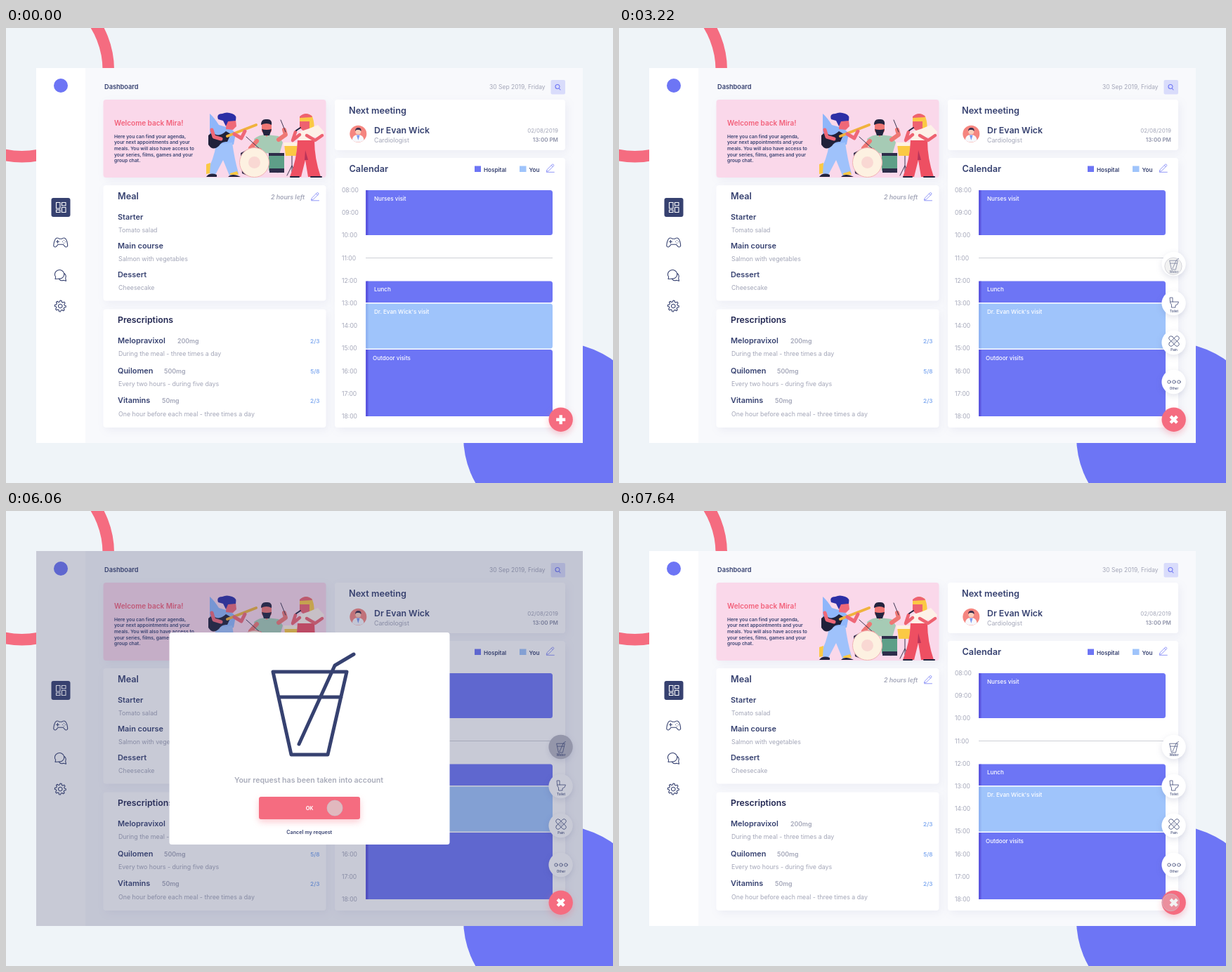
Recreate the animation shown at these times as an HTML page. Size 864 by 648 pixels, loop 8000 ms.

```html
<!DOCTYPE html>
<html lang="en">
<head>
<meta charset="utf-8">
<title>Dashboard</title>
<style>
  html, body { margin: 0; height: 100%; overflow: hidden; background: #eff4f8; }
  svg { display: block; width: 100vw; height: 100vh; font-family: Inter, sans-serif; }
  text { fill: #364170; white-space: pre; }
  .title { font-size: 12.7px; font-weight: 600; }
  .sub { font-size: 10.9px; font-weight: 600; }
  .note { font-size: 8.8px; fill: #a3a6b8; }
  .bold { font-weight: 600; }
  .hour { font-size: 8.5px; fill: #a3a6b8; }
  .event { font-size: 8.1px; font-weight: 500; fill: #fff; }
  .count { font-size: 8.2px; font-weight: 600; fill: #82abf0; text-anchor: end; }
  .copy { font-size: 6.75px; font-weight: 600; }
  .tag { font-size: 4.6px; font-weight: 500; text-anchor: middle; }
  .mid { text-anchor: middle; }
  .card { fill: #fff; filter: drop-shadow(3px 4px 6px rgba(80, 90, 160, .07)); }
  .line { fill: none; stroke: #364170; stroke-width: 1.1; stroke-linecap: round; stroke-linejoin: round; }
  .thin { stroke-width: .75; }
  .blue { stroke: #6d75f5; }
  .bubble { fill: #fff; filter: drop-shadow(0 3px 4px rgba(60, 65, 120, .14)); }
  .glow { fill: #f56c80; filter: drop-shadow(0 4px 5px rgba(245, 108, 128, .35)); }
</style>
</head>
<body>
<svg viewBox="0 0 864 648">
  <defs>
    <path id="glass" d="M380 229H485L458 347H406ZM388 265H477M417 332L468 220L495 204"/>
    <path id="pencil" class="line blue thin" d="M-4.500 2.500L2.500-4.500Q3.500-5.500 4.500-4.500Q5.500-3.500 4.500-2.500L-2.500 4.500L-5.300 5.300ZM1.500-3.500L3.500-1.500M-5.300 6.300H5.500"/>
  </defs>

  <circle cx="22.600" cy="60" r="123.200" fill="none" stroke="#f56c80" stroke-width="16.500"/>
  <circle cx="785.300" cy="582" r="134.300" fill="#6d75f5"/>
  <path fill="#f8f9fc" d="M43 57H821V591H43Z"/>
  <path fill="#fff" d="M43 57H113V591H43Z"/>

  <!-- sidebar -->
  <circle cx="78" cy="82" r="10" fill="#6d75f5"/>
  <rect x="64.500" y="242" width="27" height="27" rx="3" fill="#364170"/>
  <path class="line" style="stroke:#fff" d="M71.500 248.500H77V257H71.500ZM79.500 248.500H85V253H79.500ZM71.500 259H77V262.500H71.500ZM79.500 255.500H85V262.500H79.500Z"/>
  <path class="line" d="M73 299Q75 299 76 300.300H79.500Q80.500 299 82.500 299Q86 299 87.500 307.500Q88.300 312 85.500 312Q84 312 81.500 308.300H74Q71.500 312 70 312Q67.200 312 68 307.500Q69.500 299 73 299ZM71.500 304.300H75.500M73.500 302.300V306.300M80.500 304.300h.1M84.500 304.300h.1M82.500 302.300h.1M82.500 306.300h.1"/>
  <path class="line" d="M70 357.500L70.700 354.500A6.700 6.300 0 1 1 75 357ZM82.500 349.300Q86.500 352 84.700 356.300L85.500 360.300L81.700 359.300Q77.700 361 75 357"/>
  <g class="line" id="gear" transform="translate(77.300 396)"><circle r="2.800"/></g>

  <!-- header -->
  <text x="140" y="87" class="bold" font-size="9.200">Dashboard</text>
  <text x="688" y="87" class="hour">30 Sep 2019, Friday</text>
  <rect x="775.500" y="74" width="20.500" height="20.500" rx="2" fill="#d9dcfb"/>
  <path class="line blue" d="M788 83.500a3 3 0 1 0-6 0a3 3 0 1 0 6 0M787.200 86L789 88"/>

  <!-- banner -->
  <rect class="card" x="138.500" y="102" width="317" height="111" rx="4" style="fill:#fad8ea"/>
  <text x="154" y="138.500" class="bold" font-size="10" style="fill:#f2607a">Welcome back Mira!</text>
  <g id="copy"></g>
  <g stroke-linecap="round" stroke-linejoin="round">
    <!-- guitarist -->
    <path fill="#8fb6fa" d="M290 122Q296 127 303 138L320 143L327 150L324 166L301 169L290 153Z"/>
    <path fill="#ef6878" d="M314 129L327 131L328 140L323 145L313 144Z"/>
    <path fill="#2c2fa6" d="M302 130Q299 122 308 122Q314 119 322 122Q329 124 327 132L316 133L313 140L309 132Z"/>
    <path fill="#9fc2fb" d="M299 166L322 163Q325 186 331 207L318 210L309 188L298 209L285 206Q296 187 299 166Z"/>
    <path fill="#fbc944" d="M285 194L291 192L290 207L285 208ZM319 207L329 204L331 209H319Z"/>
    <path fill="#23243f" d="M285 212Q290 205 300 209V212ZM316 212Q322 206 334 212Z"/>
    <path fill="#20213a" d="M288 153Q293 147 299 152Q306 154 313 147L320 151L315 162Q307 161 303 168Q294 176 288 166Z"/>
    <path fill="none" stroke="#f0b23c" stroke-width="4" d="M315 154L356 138"/>
    <path fill="none" stroke="#ef6878" stroke-width="5" d="M293 145L296 155L306 158M325 151L335 157L340 147"/>
    <!-- drummer -->
    <path fill="#a6cbb5" d="M353 158Q361 151 372 152L388 154L394 163L389 180L357 177Z"/>
    <path fill="#ef7774" d="M364 133H378V147L371 155L364 147Z"/>
    <path fill="#23243f" d="M363 138Q363 129 371 130Q379 129 378 138Q371 134 363 138ZM364 144Q371 146 378 144L375 153H367Z"/>
    <path fill="none" stroke="#ef7774" stroke-width="6" d="M357 161L348 171L361 174M388 159L398 152L396 145"/>
    <path fill="none" stroke="#3a3550" d="M398 148L391 131M362 173L342 155M407 169V205M400 210L407 196L414 210"/>
    <path fill="#5e9f88" d="M374 180H396V204Q386 209 374 203Z"/>
    <path fill="#2e2d4a" d="M374 178H396V182H374ZM375 200H396V206H375ZM334 178L346 172V211L336 207Z"/>
    <circle cx="353.500" cy="191.500" r="21" fill="#fdf1e1" stroke="#f2b3b4"/>
    <circle cx="353.500" cy="191.500" r="8.500" fill="#f9d8d3"/>
    <path fill="#fbc944" d="M396 165H415L413 182H398Z"/>
    <path fill="#fdf1e1" d="M395 163H416V168H395Z"/>
    <!-- singer -->
    <path fill="#fbc944" d="M418 127Q427 118 436 126Q440 137 438 149L430 151L418 139Z"/>
    <path fill="#ee6270" d="M418 126Q427 118 436 126L432 130V143L425 148L418 142Z"/>
    <path fill="#fbc944" d="M418 128L435 127L436 133L418 133Z"/>
    <path fill="#fdf1e8" d="M417 148L432 143L444 138L453 148L450 156L438 155V164H416Z"/>
    <path fill="#ee4f62" d="M415 160H439Q439 186 448 212H430L426 188L420 212H404Q414 188 415 160Z"/>
    <path fill="#b83459" d="M426 174L430 188L425 188Z"/>
    <path fill="none" stroke="#ee6270" stroke-width="4.500" d="M418 152L408 160L412 148M450 153L440 160L428 153"/>
    <path fill="none" stroke="#23243f" stroke-width="2" d="M413 146L419 142M405 212H417M434 212H449"/>
  </g>

  <!-- meal -->
  <rect class="card" x="138.500" y="224" width="317" height="164.500" rx="4"/>
  <text x="159" y="244" class="title">Meal</text>
  <text x="377" y="244" class="note bold" font-style="italic">2 hours left</text>
  <use href="#pencil" x="440" y="239.500"/>
  <g id="meal"></g>

  <!-- prescriptions -->
  <rect class="card" x="138.500" y="400.500" width="317" height="168.500" rx="4"/>
  <text x="159" y="420" class="title" style="fill:#222752;font-size:12.300px">Prescriptions</text>
  <g id="pills"></g>

  <!-- next meeting -->
  <rect class="card" x="468" y="102" width="328" height="72" rx="4"/>
  <text x="488" y="121.500" class="title">Next meeting</text>
  <circle cx="501.300" cy="150.700" r="12" fill="#f5857f"/>
  <path fill="#f7f8fc" d="M493 160Q493 152 501 152T509.500 160Q501 165 493 160Z"/>
  <path fill="#7c9af0" d="M499 152.500H503.500L501.300 160Z"/>
  <circle cx="501.300" cy="147.500" r="4" fill="#fbcdb9"/>
  <path fill="#3a2f4d" d="M497 147Q497 142 501.500 142T505.600 147L503 145H499Z"/>
  <text x="524" y="150" class="title" style="font-size:12.300px">Dr Evan Wick</text>
  <text x="524" y="163" class="note">Cardiologist</text>
  <text x="786" y="149.300" font-size="8" text-anchor="end" style="fill:#a3a6b8">02/08/2019</text>
  <text x="786" y="161.500" font-size="8" class="bold" text-anchor="end" style="fill:#8f93aa">13:00 PM</text>

  <!-- calendar -->
  <rect class="card" x="468" y="185" width="328" height="384" rx="4"/>
  <text x="488.500" y="205" class="title">Calendar</text>
  <path fill="#6d75f5" d="M667 196.500h9v8.500h-9Z"/>
  <path fill="#9fc4fb" d="M731 196.500h9.500v8.500h-9.500Z"/>
  <text x="680" y="205" class="bold" font-size="8.100">Hospital</text>
  <text x="744.500" y="205" class="bold" font-size="8.100">You</text>
  <use href="#pencil" x="774.800" y="199"/>
  <path stroke="#c9cbd3" stroke-width=".9" d="M512 327.500H778"/>
  <g id="calendar"></g>

  <!-- quick requests -->
  <g id="menu">
    <circle class="bubble" id="water" cx="789.600" cy="336" r="17.200"/>
    <circle class="bubble" cx="789.600" cy="392" r="17.200"/>
    <circle class="bubble" cx="789.600" cy="448" r="17.200"/>
    <circle class="bubble" cx="789.600" cy="504" r="17.200"/>
    <use href="#glass" class="line" style="stroke-width:6.500" transform="translate(743 306.500) scale(.108)"/>
    <path class="line thin" d="M784.500 384H788V390H796.500Q796 394.500 792 395V398H786.500V394Q784.500 392 784.500 390ZM784.500 390H788"/>
    <g class="line thin" transform="translate(790 446)">
      <rect x="-9" y="-3" width="18" height="6" rx="3" transform="rotate(45)"/>
      <rect x="-9" y="-3" width="18" height="6" rx="3" transform="rotate(-45)"/>
      <path d="M0-1.500V-1.400M0 1.400V1.500M-1.500 0H-1.400M1.400 0H1.500"/>
    </g>
    <g class="line thin">
      <circle cx="783" cy="504" r="2.200"/><circle cx="790" cy="504" r="2.200"/><circle cx="797" cy="504" r="2.200"/>
    </g>
    <text class="tag" x="790" y="349.300">Water</text>
    <text class="tag" x="790" y="405.300">Toilet</text>
    <text class="tag" x="790" y="460">Pain</text>
    <text class="tag" x="790" y="515">Other</text>
  </g>

  <path id="shade" fill="rgba(57,66,107,.28)" d="M43 57H821V591H43Z"/>
  <circle class="glow" cx="789.700" cy="557.700" r="17.200"/>
  <path id="plus" stroke="#fff" stroke-width="4.400" d="M-6.500 0H6.500M0-6.500V6.500"/>

  <g id="modal">
    <rect x="232.500" y="173" width="399" height="302" rx="3.500" fill="#fff"/>
    <use href="#glass" class="line" style="stroke-width:5"/>
    <text x="431" y="386.700" class="mid bold" font-size="10.600" style="fill:#a9acba">Your request has been taken into account</text>
    <rect class="glow" x="360" y="407" width="144" height="32" rx="3"/>
    <text x="432" y="425.600" class="mid" font-size="7.200" font-weight="700" style="fill:#fff">OK</text>
    <text x="431.700" y="459.500" class="mid bold" font-size="7.200">Cancel my request</text>
  </g>

  <circle id="cursor" stroke="rgba(195,195,205,.65)"/>
</svg>

<script>
const $ = id => document.getElementById(id);
const label = (x, y, cls, text) => `<text x="${x}" y="${y}" class="${cls}">${text}</text>`;

$('gear').innerHTML += `<path d="M${Array.from({ length: 32 }, (_, i) => {
  const r = i % 4 < 2 ? 8 : 6, a = (i + (i % 2 ? .15 : -.15)) * Math.PI / 16;
  return `${(r * Math.cos(a)).toFixed(2)} ${(r * Math.sin(a)).toFixed(2)}`;
}).join('L')}Z"/>`;

$('copy').innerHTML = [
  'Here you can find your agenda,', 'your next appointments and your',
  'meals. You will also have access to', 'your series, films, games and your', 'group chat.'
].map((s, i) => label(154, 156.7 + i * 8.6, 'copy', s)).join('');

$('meal').innerHTML = [
  ['Starter', 'Tomato salad'], ['Main course', 'Salmon with vegetables'], ['Dessert', 'Cheesecake']
].map(([course, dish], i) =>
  label(159, 272.5 + i * 41, 'sub', course) + label(160, 290.5 + i * 41, 'note', dish)).join('');

$('pills').innerHTML = [
  ['Melopravixol', 244, '200mg', '2/3', 'During the meal - three times a day'],
  ['Quilomen', 225, '500mg', '5/8', 'Every two hours - during five days'],
  ['Vitamins', 222, '50mg', '2/3', 'One hour before each meal - three times a day']
].map(([name, x, dose, count, note], i) => {
  const y = 449 + i * 42.7;
  return label(159, y, 'sub', name) + label(x, y, 'note bold', dose) +
    label(446.5, y, 'count', count) + label(160, y + 18.3, 'note', note);
}).join('');

$('calendar').innerHTML = Array.from({ length: 11 }, (_, i) =>
  label(478, 234 + i * 32.2, 'hour', `${String(i + 8).padStart(2, '0')}:00`)).join('') + [
  [231, 64, 524, 'Nurses visit'],
  [360.5, 30.5, 524, 'Lunch'],
  [392.5, 64, 524, "Dr. Evan Wick's visit", true],
  [458, 95, 522, 'Outdoor visits']
].map(([y, h, x, text, own]) =>
  `<rect x="512" y="${y}" width="266" height="${h}" rx="3.5" fill="${own ? '#9fc4fb' : '#6d75f5'}"/>
   <path fill="${own ? '#92b5f3' : '#5a56e0'}" d="M512 ${y}h3.5v${h}h-3.5Z"/>` +
  label(x, y + 14.8, 'event', text)).join('');

// start, duration, target x, target y, decay of x, decay of y
const moves = [
  [220, 700, 786, 557, 5, 5],
  [2300, 1000, 789, 338, 4.2, 4.2],
  [4120, 1700, 468, 423, 3.8, 8],
  [6540, 1000, 785.5, 557.5, 4.4, 5.2]
];
const clicks = [1880, 3620, 6160, 7640];
const ease = (u, k) => (1 - Math.exp(-k * u)) / (1 - Math.exp(-k));
const show = (id, on) => $(id).style.display = on ? '' : 'none';

function render(t) {
  let x = 846, y = -14;
  for (const [start, time, toX, toY, kx, ky] of moves) {
    const u = Math.min(1, Math.max(0, (t - start) / time));
    x += (toX - x) * ease(u, kx);
    y += (toY - y) * ease(u, ky);
  }
  const pressed = clicks.some(c => t >= c - 100 && t < c);
  const modal = t >= clicks[1] && t < clicks[2];
  const open = t >= clicks[0] && t < clicks[2] || t >= clicks[3];

  const cursor = $('cursor');
  cursor.setAttribute('cx', x);
  cursor.setAttribute('cy', y);
  cursor.setAttribute('r', pressed ? 11 : 12.2);
  cursor.setAttribute('fill', `rgba(217,217,217,${pressed ? .7 : .33})`);
  show('menu', open);
  show('shade', modal);
  show('modal', modal);
  $('water').style.fill = modal ? '#b7b7c2' : '';
  $('plus').setAttribute('transform', `translate(789.7 557.7) rotate(${open ? 45 : 0})`);
}

const begin = performance.now();
(function tick() {
  render((performance.now() - begin) % 8000);
  requestAnimationFrame(tick);
})();
</script>
</body>
</html>
```
